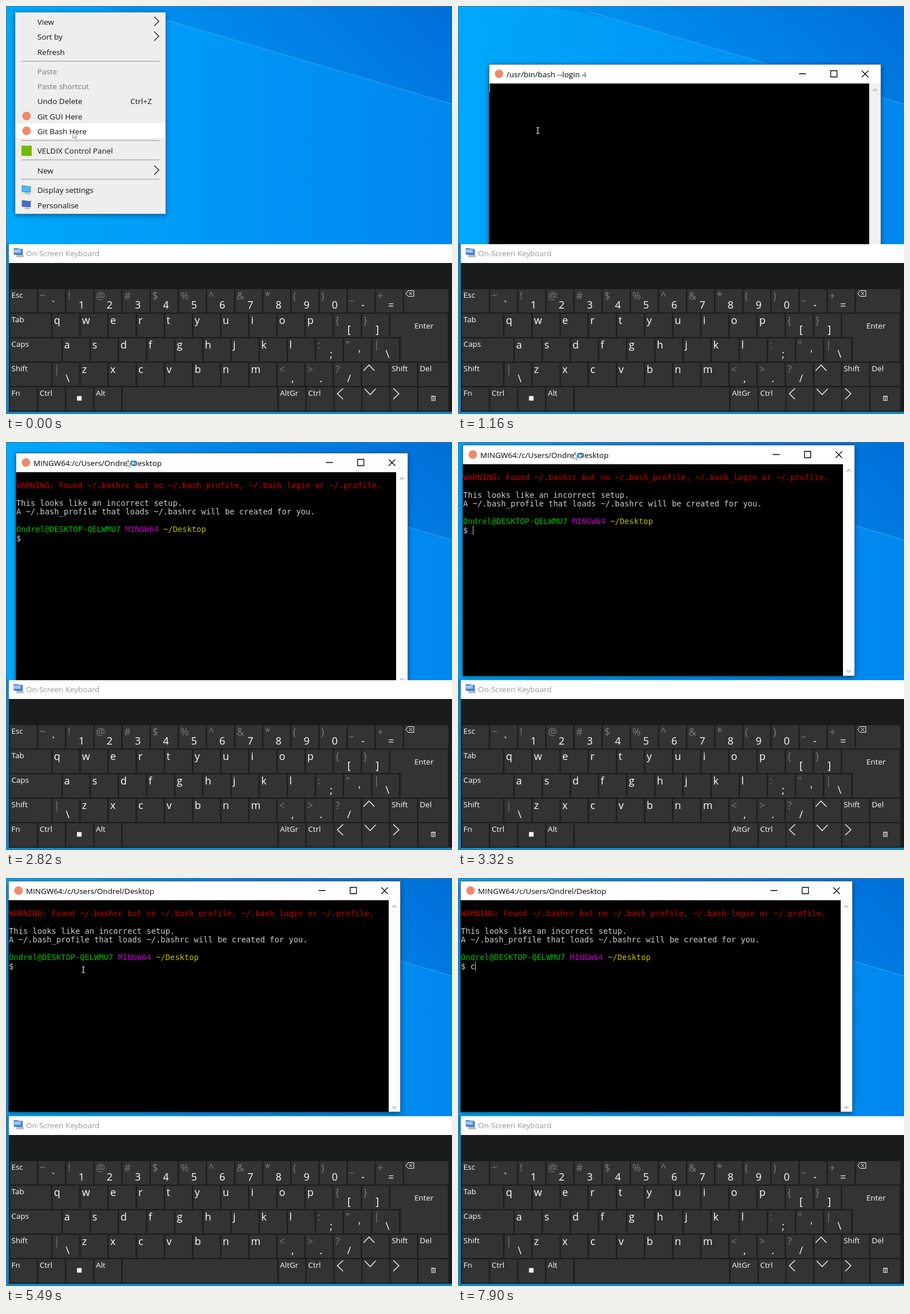
An HTML page for the animation above (8000 ms loop, 782 px wide and 716 px high).

```html
<!DOCTYPE html>
<html lang="en">
<head>
<meta charset="utf-8">
<title>Terminal and on-screen keyboard</title>
<style>
  html, body { margin: 0; width: 100%; height: 100%; overflow: hidden; background: #0090f2; }
  svg { display: block; width: 782px; height: 716px; }
  text { white-space: pre; font: 13.5px "Open Sans", "Noto Sans", sans-serif; }
  .mono text { font: 13.82px "DejaVu Sans Mono", monospace; }
  text.big { font-size: 18px; }
  .line { fill: none; stroke-width: 1.3; }
  .shadow { filter: drop-shadow(0 2px 4px rgba(0, 0, 0, .45)); }
</style>
</head>
<body>
<svg id="stage" viewBox="0 0 782 716" xmlns="http://www.w3.org/2000/svg">
  <defs>
    <linearGradient id="sky">
      <stop offset="0" stop-color="#00a8fb"/><stop offset=".35" stop-color="#009cf7"/>
      <stop offset=".6" stop-color="#0093f4"/><stop offset="1" stop-color="#0087ed"/>
    </linearGradient>
    <linearGradient id="dusk" x1="0" y1=".3" x2="1" y2="0">
      <stop offset="0" stop-color="#0088e8" stop-opacity="0"/>
      <stop offset=".45" stop-color="#0082e6" stop-opacity=".75"/><stop offset="1" stop-color="#006cd6"/>
    </linearGradient>
  </defs>
  <g id="desktop">
    <rect width="782" height="716" fill="url(#sky)"/>
    <path d="M0 0H782V172L280 25L0 -30Z" fill="url(#dusk)"/>
    <path d="M230 10L782 172" stroke="#5cc0ff" stroke-opacity=".4" stroke-width="1.5"/>
    <path d="M0 416V716H782V708H5V416Z" fill="#1583c4"/>
    <path d="M0 .5H782M.5 0V716" stroke="#4a6f8c"/>
  </g>
  <g id="menu"></g>
  <g id="window"></g>
  <g id="keyboard"></g>
  <g id="pointer"></g>
</svg>
<script>
const LOOP = 8000;
const USER = "Ondrel", HOST = "DESKTOP-QELWMU7";
const ROW_HEIGHT = 15.43, CHAR_WIDTH = 8.32;
const $ = id => document.getElementById(id);

const escapeText = s => s.replace(/&/g, "&amp;").replace(/</g, "&lt;");
const rect = (x, y, w, h, fill, extra = "") =>
  `<rect x="${x}" y="${y}" width="${w}" height="${h}" fill="${fill}" ${extra}/>`;
const text = (x, y, s, fill, extra = "") =>
  `<text x="${x}" y="${y}" fill="${fill}" ${extra}>${escapeText(s)}</text>`;
const line = (d, stroke, extra = "") => `<path class="line" d="${d}" stroke="${stroke}" ${extra}/>`;
const dot = (x, y) => `<circle cx="${x}" cy="${y}" r="7.5" fill="#f08a6c"/>`;
const monitor = (x, y, screen) =>
  `<path d="M${x} ${y}l15 2v10l-15 -1z" fill="${screen}" stroke="#47779c" stroke-width=".8"/>` +
  `<path d="M${x + 5} ${y + 13}l9 1v1.5l-9 -1z" fill="#8a9aa8"/>`;

function drawMenu() {
  const items = [
    ["View", 33], ["Sort by", 59], ["Refresh", 86], ["Paste", 120], ["Paste shortcut", 146],
    ["Undo Delete", 172], ["Git GUI Here", 199], ["Git Bash Here", 225],
    ["VELDIX Control Panel", 259], ["New", 294], ["Display settings", 328], ["Personalise", 355]
  ];
  const rules = [97, 236, 270, 304].map(y => rect(27, y - .5, 242, 1, "#929292"));
  const arrows = [27, 53, 288].map(y => line(`M260 ${y - 8}l8 8l-8 8`, "#111"));
  const labels = items.map(([s, y]) => text(55, y, s, s.startsWith("Paste") ? "#757575" : "#111"));
  $("menu").innerHTML =
    rect(16, 11, 264, 354, "#eeeeee", 'class="shadow"') +
    rect(16.5, 11.5, 263, 353, "none", 'stroke="#c8c8c8"') +
    rect(17, 206, 262, 26, "#fff") +
    rules.join("") + arrows.join("") + labels.join("") +
    text(218, 172, "Ctrl+Z", "#111") + dot(36, 193) + dot(36, 219) +
    rect(27, 245, 18, 18, "#76b900") +
    monitor(28, 315, "#4db8f0") + monitor(28, 341, "#3c6fd0") +
    line("M33 352l11 -10", "#7a4bb0", 'stroke-width="2"');
}

function drawKeyboard() {
  const step = 49.35, keyHeight = 41;
  const face = (x, y, w) => rect(x + 1.5, y, w - 2.3, keyHeight, "#333333");
  const small = (x, y, s) => text(x + 4, y + 14.5, s, "#fff");
  const glyph = (x, y, s) => text(x + 4, y + 18, s, "#fff", 'class="big"');
  const dual = (x, y, [upper, lower]) =>
    text(x + 4, y + 18, upper, "#7c7c7c", 'class="big"') +
    text(x + 28, y + 34, lower, "#fff", 'class="big" text-anchor="middle"');
  const key = (x, y, w, label = "") => face(x, y, w) +
    (label.length === 1 ? glyph : label.length === 2 && label !== "Fn" ? dual : small)(x, y, label);
  const run = (x, y, labels) => labels.map((s, i) => key(x + i * step, y, step, s)).join("");
  const words = s => s.split(" ");

  let out = rect(5, 418, 777, 294, "#1a1c1b") + rect(5, 418, 777, 33, "#fff") +
    text(35, 439, "On-Screen Keyboard", "#999") +
    monitor(14, 425, "#3f7fd6") + rect(13, 427, 13, 6, "#9cc4ee") + rect(18, 437, 13, 4, "#b9bdc4");

  out += key(5.5, 497, step, "Esc") +
    run(55, 497, words("~` !1 @2 #3 $4 %5 ^6 &7 *8 (9 )0 _- +=")) + face(696.4, 497, 80);
  out += key(5.5, 540, 74.5, "Tab") + run(80, 540, words("q w e r t y u i o p {[ }]"));
  out += key(5.5, 583, 92.5, "Caps") + run(98, 583, words("a s d f g h j k l :; \"' |\\"));
  out += `<path d="M673.5 540H774.5V624H692V581H673.5Z" fill="#333333"/>` + text(716, 566, "Enter", "#fff");
  out += key(5.5, 626, 74.5, "Shift") + run(80, 626, words("|\\ z x c v b n m <, >. ?/")) +
    face(622.9, 626, step) + key(672.2, 626, step, "Shift") + key(721.5, 626, 55, "Del");
  out += key(5.5, 669, step, "Fn") + key(55, 669, step, "Ctrl") + face(104.3, 669, step) +
    key(153.6, 669, step, "Alt") + face(203, 669, 273.5) + key(476.5, 669, step, "AltGr") +
    key(525.8, 669, step, "Ctrl") + face(574.5, 669, step) + face(623.5, 669, step) +
    face(672.5, 669, step) + face(722, 669, 54.5);

  out += line("M627 640l9.5 -10l9.5 10M629 672l9.5 10l9.5 -10M591 671l-10 9.5l10 9.5M679 671l10 9.5l-10 9.5", "#fff") +
    line("M701 504.5l4 -5h10v10h-10zM707 502l5 5m0 -5l-5 5", "#fff", 'style="stroke-width:1"') +
    rect(124.5, 684.5, 8, 8, "#fff") +
    line("M746 684.5h6.5v8h-6.5zM746 686h6.5M747.5 688.5h3.5M747.5 690.5h3.5", "#e8e8e8", 'style="stroke-width:1"');
  $("keyboard").innerHTML = out;
}

function drawWindow() {
  const row = (n, s, fill, column = 0, id = "") =>
    text(1 + column * CHAR_WIDTH, 46.6 + n * ROW_HEIGHT, s, fill, id && `id="${id}"`);
  const account = `${USER}@${HOST}`;
  $("window").innerHTML =
    rect(0, 0, 688, 406, "#fff", 'class="shadow"') + dot(18, 17) +
    `<text id="title" x="31" y="22.5" fill="#000"></text>` +
    line("M544 17h12M599.5 11.5h11v11h-11zM654 11.5l11.5 11.5m0 -11.5l-11.5 11.5", "#000") +
    rect(0, 34, 667, 372, "#000") + rect(667, 34, 21, 372, "#fcfcfc", 'id="scrollbar"') +
    line("M673.5 47l3.5 -3.5l3.5 3.5M673.5 395.5l3.5 3.5l3.5 -3.5", "#a8a8a8") +
    rect(.5, .5, 687, 405, "none", 'stroke="#2b4358" stroke-opacity=".75"') +
    `<g class="mono"><g id="warning">` +
    row(1, "WARNING: Found ~/.bashrc but no ~/.bash_profile, ~/.bash_login or ~/.profile.", "#c40000") +
    row(3, "This looks like an incorrect setup.", "#cccccc") +
    row(4, "A ~/.bash_profile that loads ~/.bashrc will be created for you.", "#cccccc") +
    `</g><g id="prompt">` +
    row(6, account, "#00bf00") + row(6, "MINGW64", "#bf00bf", account.length + 1) +
    row(6, "~/Desktop", "#bfbf00", account.length + 9) + row(7, "$", "#cccccc") +
    row(7, "c", "#cccccc", 2, "typed") + `</g></g>` +
    rect(0, 0, 1, 16, "#c8c8c8", 'id="caret"');
}

const pointers = {
  arrow: `<path d="M0 0V10L2.6 7.8L4.3 11.5L6 10.7L4.4 7.2H7.5Z" fill="#fff" stroke="#777" stroke-width=".8"/>`,
  ring: `<circle r="5.6" fill="none" stroke="#40566b" stroke-width="1.1"/>`,
  ringBusy: `<circle r="5.2" fill="none" stroke="#40566b" stroke-width="1.1"/>
    <circle cx="7.5" cy="-1" r="4" fill="#fff" stroke="#1688d8" stroke-width="2"/>`,
  busy: `<path d="M-6 -6V4L-3.4 2L-1.7 6L0 5.2L-1.6 1.4H1.5Z" fill="#fff" stroke="#777" stroke-width=".8"/>
    <circle cx="5" cy="-2" r="3.6" fill="#bfe6fb" stroke="#1688d8" stroke-width="2"/>`,
  beam: `<path d="M-2.5 -5H2.5M-2.5 5H2.5M0 -5V5" stroke="#fff" stroke-width="1.1"/>`,
  none: ""
};

// Each step: start time, pointer kind, x, y
const pointerSteps = [
  [0, "arrow", 117, 222], [130, "arrow", 124, 222], [250, "arrow", 132, 220], [370, "arrow", 139, 218],
  [620, "ring", 140.5, 219.5], [1030, "beam", 140, 218.5],
  [1450, "beam", 172, 195], [1570, "beam", 222, 153], [1700, "arrow", 252, 117],
  [2090, "ring", 254.5, 122.5], [2340, "ringBusy", 236, 99], [2460, "busy", 229, 80],
  [2580, "busy", 224, 62], [2700, "busy", 220, 48], [2820, "busy", 218, 39], [2940, "busy", 214, 32],
  [3080, "busy", 211, 28], [3200, "busy", 210, 27], [3320, "busy", 209, 26], [3440, "busy", 207, 26],
  [3560, "ring", 204.5, 25.5], [4080, "arrow", 201, 20], [4450, "arrow", 398, 48], [4570, "beam", 574, 89],
  [4820, "beam", 288, 146], [4970, "beam", 242, 153], [5090, "beam", 206, 158],
  [5240, "beam", 135.5, 161], [7900, "none", 0, 0]
];

// Each step: start time, window x, window y
const windowSteps = [
  [0, 54, 102], [2340, 45, 92], [2460, 36, 69], [2580, 28, 48], [2700, 21, 31], [2820, 17, 19],
  [2940, 13, 11], [3080, 10, 7], [3200, 9, 5], [3320, 8, 5], [3440, 6, 5], [3560, 4, 5]
];

// Each step: start time, caret row (-1 hides it), caret column
const caretSteps = [
  [0, 0, 0], [1310, 5, 0], [1570, -1, 0], [2940, 7, 2], [3440, -1, 2], [3930, 7, 2], [4450, -1, 2],
  [4970, 7, 2], [5490, -1, 2], [6000, 7, 2], [6500, -1, 2], [7020, 7, 2], [7520, -1, 2], [7900, 7, 3]
];

const current = (steps, t) => steps.findLast(s => s[0] <= t);
const show = (id, on) => $(id).setAttribute("visibility", on ? "inherit" : "hidden");

function render(t) {
  show("menu", t < 890);
  show("window", t >= 1030);
  show("warning", t >= 1310);
  show("prompt", t >= 1570);
  show("typed", t >= 7900);

  const [, x, y] = current(windowSteps, t);
  const opening = t < 1160;
  $("window").setAttribute("transform", `translate(${x} ${y})` +
    (opening ? " translate(344 203) scale(.94) translate(-344 -203)" : ""));
  $("window").setAttribute("opacity", opening ? .65 : 1);
  $("title").textContent = t < 1450 ? "/usr/bin/bash --login -i" : `MINGW64:/c/Users/${USER}/Desktop`;
  $("scrollbar").setAttribute("fill", t < 1310 ? "#f0f0f0" : "#fcfcfc");

  const [, row, column] = current(caretSteps, t);
  show("caret", row >= 0);
  $("caret").setAttribute("x", Math.round(1 + column * CHAR_WIDTH));
  $("caret").setAttribute("y", Math.round(34 + Math.max(row, 0) * ROW_HEIGHT));

  const [, kind, px, py] = current(pointerSteps, t);
  $("pointer").innerHTML = pointers[kind];
  $("pointer").setAttribute("transform", `translate(${px} ${py})`);
}

drawMenu();
drawKeyboard();
drawWindow();

const start = performance.now();
function tick() {
  render((performance.now() - start) % LOOP);
  requestAnimationFrame(tick);
}
tick();
</script>
</body>
</html>
```
